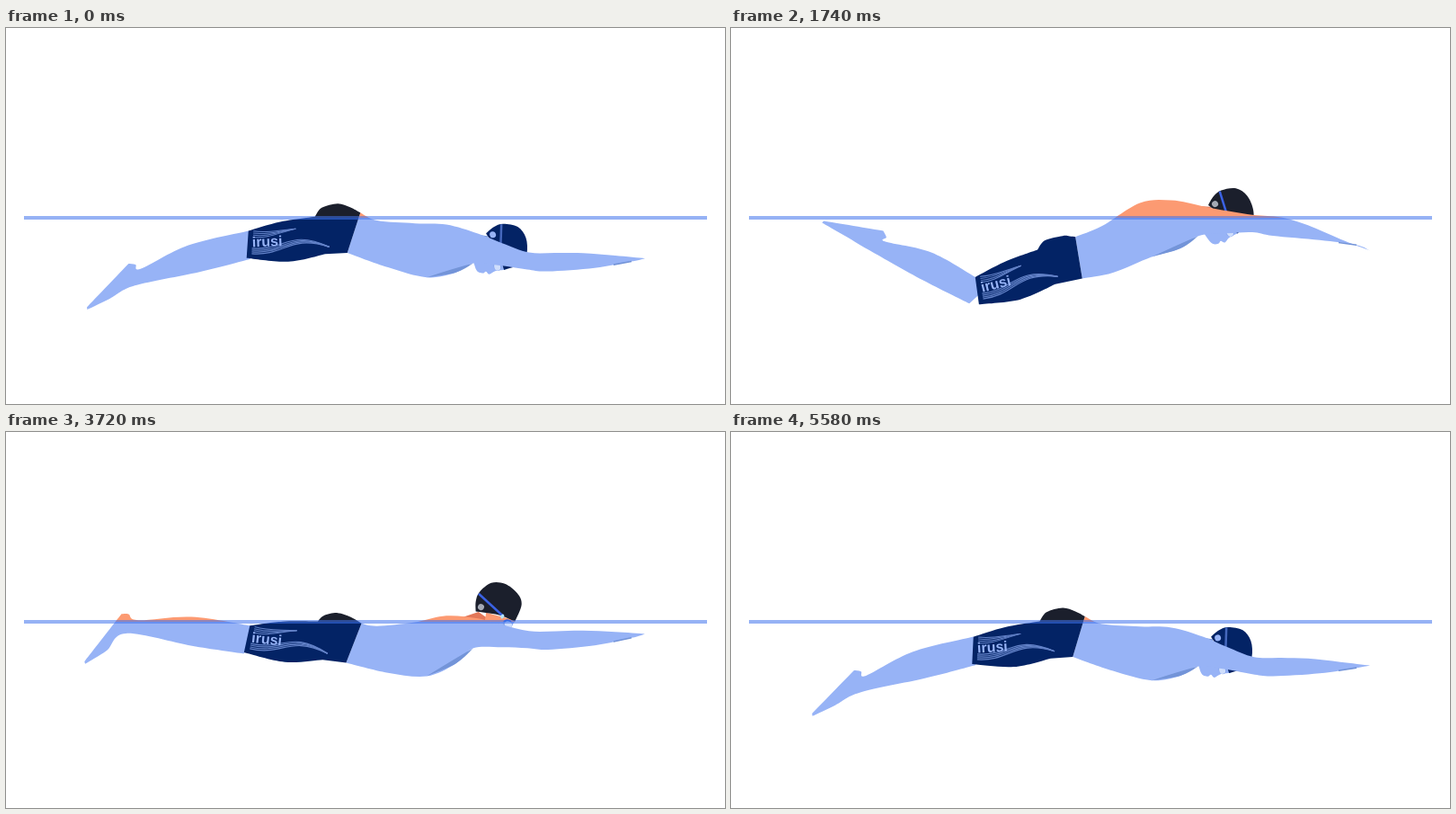
An HTML page with a canvas that plays this animation: 800x418 px, repeating every 5.64 s.

```html
<!DOCTYPE html>
<html lang="en">
<head>
<meta charset="utf-8">
<title>Swimmer</title>
<style>
html, body { margin: 0; width: 100%; height: 100%; overflow: hidden; background: #fff; }
canvas { display: block; }
</style>
</head>
<body>
<canvas id="stage" width="800" height="418"></canvas>
<script>
const g = document.getElementById('stage').getContext('2d');
const LOOP = 5640, KICK = LOOP / 2, STEP = 60, SURFACE = 211, RAD = Math.PI / 180;

const air = { skin: '#fc9a72', shade: '#e37758', cloth: '#1b1f2c', trim: '#566079',
  strap: '#3b62e4', lens: '#b5e6fa', rim: '#2f62dc', mark: '#a4a9b5' };
const water = { skin: '#97b3f6', shade: '#7394d8', cloth: '#032365', trim: '#6382c8',
  strap: '#4568bd', lens: '#cfdefc', rim: '#86a5ee', mark: '#97b3f6' };

// Leg angles below the horizontal at a few moments of one kick
const kickTimes = [0, 360, 780, 1380, 1740, 2140, 2340];
const kick = {
  thigh: [6.3, 1.7, -1.7, -0.2, 18, 17.5, 16.5],
  shin: [16.6, 9.1, -1.5, -25.3, -24.2, 15, 16.4],
  foot: [32, 39, 42, 10.4, -23.6, 28, 31]
};

// Torso and arm profile: x and thickness above the spine, then below it
const profile = [
  [413, 22, 425, 30], [455, 30, 468, 30], [490, 27.5, 500, 26], [525, 16.5, 520, 16.5],
  [552, 12.5, 552, 12.5], [582, 9.5, 580, 9.5], [612, 9, 603, 11.5], [642, 8, 655, 8.5],
  [678, 4, 696, 2.5]
];

const lerp = (a, b, u) => a + (b - a) * u;
const cosd = a => Math.cos(a * RAD), sind = a => Math.sin(a * RAD);

function smooth(from, to, t) {
  const u = Math.min(1, Math.max(0, (t - from) / (to - from)));
  return u * u * (3 - 2 * u);
}

// Smooth periodic interpolation through the kick moments
function sample(values, t) {
  const n = values.length;
  const at = i => kickTimes[(i + n) % n] + Math.floor(i / n) * KICK;
  const v = i => values[(i + n) % n];
  let i = 0;
  while (at(i + 1) <= t) i++;
  const span = at(i + 1) - at(i), u = (t - at(i)) / span, w = 1 - u;
  const slope = j => (v(j + 1) - v(j - 1)) / (at(j + 1) - at(j - 1)) * span;
  return v(i) * w * w * (1 + 2 * u) + v(i + 1) * u * u * (3 - 2 * u)
    + slope(i) * u * w * w - slope(i + 1) * u * u * w;
}

// The body wave repeats every kick; a breath lifts the front on every second one
function poseAt(t) {
  const phase = t % KICK, deg = phase / KICK * 360;
  const wave = (mean, size, peak, size2 = 0, peak2 = 0) =>
    mean + size * cosd(deg - peak) + size2 * cosd(2 * deg - peak2);
  const breath = smooth(2950, 4500, t) - smooth(4850, 5450, t);
  return {
    thigh: sample(kick.thigh, phase),
    shin: sample(kick.shin, phase),
    foot: sample(kick.foot, phase),
    waist: wave(238, 15, 200, 4.8, 40),
    chest: wave(237, 12.5, 35) + 5 * breath,
    shoulder: wave(230, 16.5, 25) - 14 * breath,
    arm: wave(240, 20, 10, 5.5, -95) - 17 * breath,
    hand: wave(247, 21, 300, 4, 250) - 11 * breath,
    head: [559 - 20 * breath, wave(220.5, 22, 12) - 53 * breath],
    turn: wave(65, 11.5, -5) * (1 - Math.min(1, 1.1 * breath))
  };
}

// Frame of a limb pointing left, tilted down by the angle: along, above
const limb = ([x, y], angle) => (u, v) =>
  [x - u * cosd(angle) - v * sind(angle), y + u * sind(angle) - v * cosd(angle)];

function spineY(p, x) {
  if (x > 582) return lerp(p.arm, p.hand, ((x - 582) / 129) ** 1.7);
  if (x > 525) return lerp(p.shoulder, p.arm, (x - 525) / 57);
  if (x > 461) return lerp(p.chest, p.shoulder, (x - 461) / 64);
  return lerp(p.waist, p.chest, (x - 387) / 74);
}

// All joints and outlines that follow from a pose
function build(p) {
  const waist = [387, p.waist], thigh = limb(waist, p.thigh);
  const hem = thigh(119, 0), shin = limb(hem, p.shin);
  const length = 130 - 0.18 * Math.abs(p.thigh - p.shin);
  const foot = limb(shin(length, 0), p.foot);
  const slope = Math.atan2(p.chest - p.waist, 74) / RAD;
  const lean = 0.9 * p.thigh - 0.45 * slope - 17;
  const belt = side => [387 + side * sind(lean), p.waist + side * cosd(lean)];
  const top = [], low = [];
  for (const [x1, up, x2, down] of profile) {
    const y = spineY(p, (x1 + x2) / 2);
    top.push([x1, y - up]);
    low.unshift([x2, y + down]);
  }
  return { ...p, thigh, tilt: p.thigh, hem, shin, length, foot, lean, top, low,
    back: belt(-23.5), front: belt(23.5) };
}

// Continues the current path smoothly through the points
function curve(p) {
  g.lineTo(...p[0]);
  for (let i = 0; i < p.length - 1; i++) {
    const a = p[i - 1] || p[i], b = p[i], c = p[i + 1], d = p[i + 2] || c;
    g.bezierCurveTo(b[0] + (c[0] - a[0]) / 6, b[1] + (c[1] - a[1]) / 6,
      c[0] - (d[0] - b[0]) / 6, c[1] - (d[1] - b[1]) / 6, ...c);
  }
}

function fill(color, ...runs) {
  g.beginPath();
  runs.forEach(curve);
  g.fillStyle = color;
  g.fill();
}

function line(color, width, path) {
  g.strokeStyle = color;
  g.lineWidth = width;
  g.stroke(new Path2D(path));
}

function disc(color, x, y, rx, ry = rx) {
  g.beginPath();
  g.ellipse(x, y, rx, ry, 0, 0, 7);
  g.fillStyle = color;
  g.fill();
}

function drawLeg(c, { thigh, shin, foot, length }) {
  fill(c.skin,
    [foot(65, 1.5), foot(0, 18)],
    [foot(0, 18), foot(-6, 13), shin(length - 7, 8), shin(64, 18), thigh(116, 15)],
    [thigh(108, 0)],
    [shin(2, -16.5), shin(60, -14), shin(length + 5, -8), foot(38, -4), foot(66, -1)]);
}

function drawShorts(c, { thigh, tilt, hem, lean, back, front, waist }) {
  const seatTop = [369, waist - 27 + 0.3 * lean], seat = thigh(41, 22.5);
  const bulge = [lerp(seat[0], seatTop[0], 0.3), lerp(seat[1], seatTop[1], 0.68)];
  const hip = [lerp(seatTop[0], back[0], 0.55), lerp(seatTop[1], back[1], 0.4)];
  fill(c.cloth, [thigh(116.3, 15), thigh(80, 21), seat], [seat, bulge, seatTop, hip, back],
    [front], [thigh(34, -20), thigh(76, -24), thigh(121.7, -15)]);

  g.save();
  g.translate(...hem);
  g.rotate((8 - tilt) * RAD);
  for (let k = 0; k < 4; k++) {
    line(c.trim, 1, `M6,${-15 + k * 2.2} C22,${-13 + k * 2} 34,${-17 + k} 53,-19`);
    line(c.trim, 1.2, `M5,${4 + k * 2} C42,${6 + k * 2} 46,${-19 + k * 2} 91,0`);
  }
  g.rotate(-4 * RAD);
  g.font = 'bold 16px "Liberation Sans", Arial, sans-serif';
  g.textAlign = 'center';
  g.fillStyle = water.skin;
  g.fillText('irusi', 22, 3);
  g.restore();
}

function drawHead(c, { head, turn, top }) {
  const face = limb(head, 180 - turn);
  const neck = (u, v) => face(u, v);
  const [, , , nape, collar] = top;
  fill(c.shade, [[507, nape[1] - 1]], [neck(-16, 20)], [neck(-3, 22)],
    [[538, collar[1] + 3]], [[515, nape[1] + 6]]);
  g.save();
  g.translate(...head);
  g.rotate(turn * RAD);
  fill(c.skin, [[-8, 17], [25, 10]],
    [[25, 10], [24, 21], [26, 28], [22, 31], [23, 35], [18, 41], [0, 42]]);
  fill(c.cloth, [[-19, 21], [-24, 11], [-25, 0], [-18, -15], [-4, -21], [13, -18],
    [23, -9], [25, 11]], [[25, 11], [5, 13], [-19, 21]]);
  line(c.strap, 2.5, 'M-25,2 L11,12');
  disc(c.rim, 19, 17, 5.5, 4.6);
  disc(c.lens, 20, 17.5, 4.2, 3.4);
  disc(c.lens, 10, 12.5, 1.8, 2.6);
  disc(c.mark, -16, 14, 3.5);
  g.restore();
}

function drawBody(c, { top, low, back, front, hand }) {
  const tip = [711, hand];
  fill(c.skin, [back, ...top, tip], [tip, ...low, front]);

  const [pit, rib, chest] = low.slice(5, 8);
  g.beginPath();
  curve([pit, rib, chest]);
  g.quadraticCurveTo(2 * (rib[0] - 3) - (pit[0] + chest[0]) / 2,
    2 * (rib[1] - 4) - (pit[1] + chest[1]) / 2, ...pit);
  g.fillStyle = c.shade;
  g.fill();

  const [palm, wrist] = low;
  line(c.shade, 1.6, `M${palm} L${palm[0] - 20},${lerp(palm[1], wrist[1], 0.5)}`);
}

function drawSwimmer(c, swimmer) {
  drawLeg(c, swimmer);
  drawHead(c, swimmer);
  drawBody(c, swimmer);
  drawShorts(c, swimmer);
}

function clipped(y, height, draw) {
  g.save();
  g.beginPath();
  g.rect(0, y, 800, height);
  g.clip();
  draw();
  g.restore();
}

function frame(now) {
  const t = Math.floor(now / STEP) * STEP % LOOP;
  const swimmer = build(poseAt(t));
  g.fillStyle = '#fff';
  g.fillRect(0, 0, 800, 418);
  clipped(0, SURFACE, () => drawSwimmer(air, swimmer));
  clipped(SURFACE, 418 - SURFACE, () => drawSwimmer(water, swimmer));
  g.fillStyle = 'rgba(64,115,237,.55)';
  g.fillRect(20, SURFACE - 2, 760, 4);
  requestAnimationFrame(frame);
}
frame(0);
</script>
</body>
</html>
```
